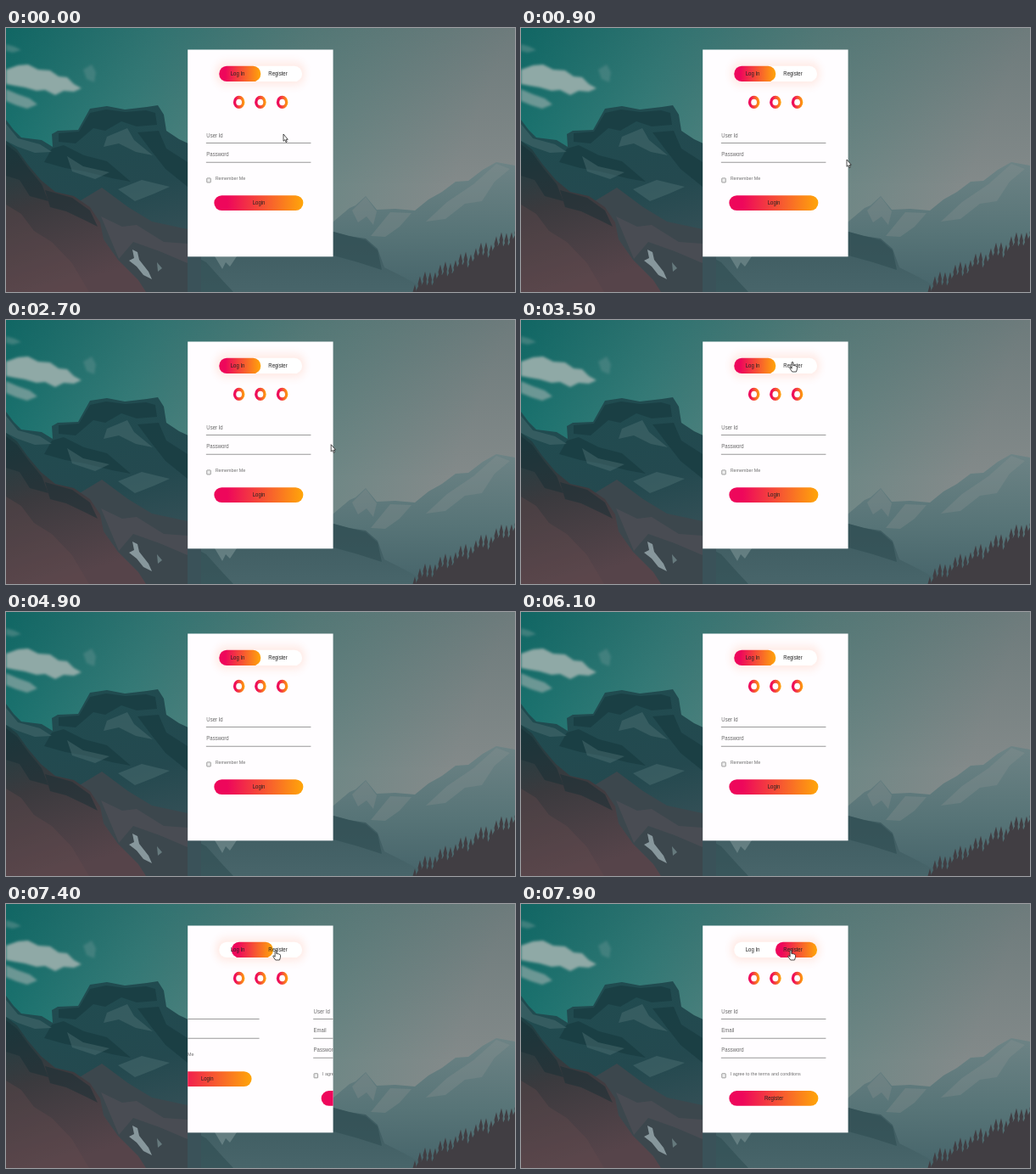
Animation of 600 by 311 pixels, one loop 8000 ms. Source, as an HTML page:

```html
<!DOCTYPE html>
<html lang="en">
<head>
<meta charset="utf-8">
<title>Login form</title>
<style>
  html, body { margin: 0; width: 100%; height: 100%; overflow: hidden; background: #3f7775; }
  svg { display: block; width: 100vw; height: 100vh; }
  text { font: 13.33px "Liberation Sans", Arial, sans-serif; fill: #222; }
  .hint { fill: #686868; }
  .small { font-size: 12px; fill: #707070; }
</style>
</head>
<body>
<svg viewBox="0 0 600 311" preserveAspectRatio="none">
  <defs>
    <linearGradient id="sky" gradientUnits="userSpaceOnUse" x1="0" y1="0" x2="520" y2="200">
      <stop offset="0" stop-color="#0f706c"/><stop offset=".3" stop-color="#37807c"/>
      <stop offset=".6" stop-color="#618582"/><stop offset="1" stop-color="#838a8a"/>
    </linearGradient>
    <linearGradient id="shade" x2="0" y2=".6">
      <stop offset="0" stop-color="#173f42" stop-opacity=".2"/>
      <stop offset="1" stop-color="#173f42" stop-opacity="0"/>
    </linearGradient>
    <linearGradient id="peak" x2=".3" y2="1">
      <stop offset="0" stop-color="#1f4c50"/><stop offset=".6" stop-color="#24494f"/>
      <stop offset="1" stop-color="#3a5259"/>
    </linearGradient>
    <linearGradient id="near" x2=".3" y2="1">
      <stop offset="0" stop-color="#1c3f43"/><stop offset=".45" stop-color="#3b3a3e"/>
      <stop offset="1" stop-color="#56444a"/>
    </linearGradient>
    <linearGradient id="far" x2="0" y2="1">
      <stop offset="0" stop-color="#6d8385"/><stop offset=".55" stop-color="#577477"/>
      <stop offset="1" stop-color="#46646a"/>
    </linearGradient>
    <linearGradient id="valley" x2="0" y2="1">
      <stop offset="0" stop-color="#3d5b60"/><stop offset="1" stop-color="#48656a"/>
    </linearGradient>
    <linearGradient id="warm">
      <stop offset="0" stop-color="#ee075b"/><stop offset=".15" stop-color="#ee075b"/>
      <stop offset="1" stop-color="#ffa609"/>
    </linearGradient>
    <filter id="soft" x="-30%" y="-80%" width="160%" height="260%"><feGaussianBlur stdDeviation="10"/></filter>
    <filter id="mist" x="-30%" y="-40%" width="160%" height="180%"><feGaussianBlur stdDeviation="1.6"/></filter>
    <clipPath id="frame"><rect width="380" height="480"/></clipPath>
  </defs>

  <!-- landscape -->
  <rect width="600" height="311" fill="url(#sky)"/>
  <rect width="600" height="311" fill="url(#shade)"/>
  <g fill="#8fa9a6" filter="url(#mist)">
    <path d="M0 49 14 44 26 43 38 49 52 50 62 57 72 58 80 66 89 71 80 75 68 74 58 79 46 73 36 74 22 70 10 68 0 66Z"/>
    <path d="M0 72 14 78 28 83 37 90 25 95 12 91 0 86Z" opacity=".7"/>
    <path d="M91 49 101 43 106 52 104 64 95 60Z" opacity=".25"/>
    <path d="M0 19 10 22 18 26 8 29 0 27Z" opacity=".35"/>
  </g>
  <path fill="url(#far)" d="M370 240 386 228 405 212 412 209 424 198 437 214 459 213 482 215 498 202 514 193 530 181 545 180 562 167 578 158 600 162V311H370Z"/>
  <g fill="#87908f" opacity=".35">
    <path d="M424 199 437 216 433 232 425 222 415 229 408 215Z"/>
    <path d="M578 160 594 166 576 181 561 204 541 207 518 225 495 228 520 205 551 184Z"/>
    <path d="M453 217 478 218 464 234 447 246 430 245Z"/>
  </g>
  <path fill="url(#valley)" d="M200 240H386L404 245 424 248 438 260 446 282 470 294 500 311H200Z"/>
  <path fill="#7b9294" opacity=".6" d="M246 269H272L264 281 259 276 255 284Z"/>
  <path fill="#2f4d53" opacity=".6" d="M214 264 236 276 254 296 268 311H200V264ZM386 240 424 250 438 262 443 285 415 276 386 268Z"/>
  <path fill="url(#peak)" d="M0 108 9 120 18 129 42 132 55 140 54 125 61 121 85 120 99 95 119 92 140 96 166 93 179 91 186 102 189 121 204 131 230 143V311H0Z"/>
  <g fill="#183b40" opacity=".7">
    <path d="M62 124 86 122 99 100 118 96 141 99 165 97 176 100 178 114 154 116 136 110 117 121 103 118 82 136 62 134Z"/>
    <path d="M54 142 68 138 92 150 119 157 147 181 125 177 93 169 70 165 45 158Z"/>
    <path d="M155 123 180 121 189 142 214 158V187L188 166 170 143Z"/>
  </g>
  <g fill="#55777a" opacity=".4">
    <path d="M0 113 14 130 40 137 54 146 34 147 14 140 0 133Z"/>
    <path d="M119 128 143 118 151 132 173 150 153 146 133 136 115 140Z"/>
    <path d="M72 151 91 163 122 170 105 178 78 169Z"/>
    <path d="M132 190 160 179 193 187 175 195 152 204Z"/>
  </g>
  <path fill="#3c474d" d="M85 205 113 188 144 211 172 228 214 237V311H92Z"/>
  <path fill="#57535a" opacity=".5" d="M112 222 137 234 154 232 186 252 214 254V277L181 263 150 252 133 272Z"/>
  <path fill="url(#near)" d="M0 133 13 143 25 160 41 179 58 193 80 198 99 211 111 229 115 249 132 273 156 297 165 311H0Z"/>
  <g fill="#182f35" opacity=".5">
    <path d="M0 137 13 147 27 166 42 184 50 204 28 198 16 179 0 174Z"/>
    <path d="M46 191 78 200 99 215 108 234 92 226 71 216 52 211Z"/>
  </g>
  <path fill="#654a4f" opacity=".35" d="M0 208 18 219 33 239 54 252 78 277 98 311H0Z"/>
  <path fill="#87979c" d="M149 261 155 264 157 273 168 287 172 296 162 291 154 281 145 274 151 271Z"/>
  <path fill="#71878a" opacity=".8" d="M178 276 184 283 179 287Z"/>
  <path id="trees" fill="#413e43"/>

  <!-- card -->
  <g transform="translate(214.2 25.5) scale(.451 .508)">
    <rect width="380" height="480" fill="#fffdff"/>
    <g clip-path="url(#frame)">
      <rect x="73" y="29" width="234" height="53" rx="26" fill="#ff6124" opacity=".12" filter="url(#soft)"/>
      <rect x="82" y="38" width="217" height="36" rx="20" ry="18" fill="#fff"/>
      <rect id="pill" x="82" y="38" width="109" height="36" rx="20" ry="18" fill="url(#warm)"/>
      <text x="112" y="61">Log In</text>
      <text x="211" y="61">Register</text>
      <g id="icons"></g>
      <g id="login"></g>
      <g id="register"></g>
    </g>
  </g>

  <!-- pointer -->
  <g id="pointer" stroke="#222" stroke-width=".8" fill="#fff" stroke-linejoin="round">
    <path id="arrow" d="M0 0V8.3L1.8 6.7 3 9.6 4.3 9 3.1 6.3H5.3Z"/>
    <path id="hand" d="M-.9 1Q0-.6.9 1V4.6L2.2 4.5 2.7 5 3.8 4.8 4.3 5.4Q5.4 5.2 5.5 6.4V8.6L4.5 12H-.3L-3.2 7.8Q-3.2 6.6-2.1 6.9L-.9 8.2Z"/>
  </g>
</svg>
<script>
const LOOP = 8000, CLICK = 7300, SLIDE = 500;
const get = id => document.getElementById(id);
const clamp = v => Math.min(1, Math.max(0, v));
const smooth = v => v * v * (3 - 2 * v);

// CSS "ease": cubic-bezier(.25, .1, .25, 1)
function ease(x) {
  const bez = (a, b, s) => 3 * a * s * (1 - s) ** 2 + 3 * b * s * s * (1 - s) + s ** 3;
  let lo = 0, hi = 1;
  for (let i = 0; i < 24; i++) {
    const mid = (lo + hi) / 2;
    if (bez(.25, .25, mid) < x) lo = mid; else hi = mid;
  }
  return bez(.1, 1, lo);
}

function form(fields, note, action) {
  const shift = (fields.length - 2) * 45;
  const rows = fields.map((name, i) =>
    `<text class="hint" x="49" y="${203 + i * 45}">${name}</text>
     <path d="M48 ${216.5 + i * 45}H322" stroke="#999" stroke-width="2"/>`).join('');
  return `${rows}
    <rect x="50" y="${298 + shift}" width="10" height="10" rx="1" fill="#eee" stroke="#858585" stroke-width="1.6"/>
    <text class="small" x="72" y="${303 + shift}">${note}</text>
    <rect x="69" y="${338 + shift}" width="233" height="35" rx="20" ry="17.5" fill="url(#warm)"/>
    <text x="186" y="${360 + shift}" text-anchor="middle">${action}</text>`;
}
get('login').innerHTML = form(['User Id', 'Password'], 'Remember Me', 'Login');
get('register').innerHTML = form(['User Id', 'Email', 'Password'], 'I agree to the terms and conditions', 'Register');
get('icons').innerHTML = [134, 190, 247].map(x =>
  `<circle cx="${x}" cy="122" r="15" fill="url(#warm)"/><circle cx="${x}" cy="122" r="7.5" fill="#fff"/>`).join('');

// Fir trees rising towards the right edge
let firs = 'M475 311';
for (let i = 0; i < 21; i++) {
  const x = 482 + i * 6, top = 302 - i * 3.1 - 9 * Math.abs(Math.sin(i * 2.3));
  firs += `L${x - 4} ${top + 16} ${x - 2} ${top + 12} ${x - 2.5} ${top + 9} ${x} ${top} ${x + 2} ${top + 9} ${x + 1.5} ${top + 12}`;
}
get('trees').setAttribute('d', firs + 'L604 311Z');

// Pointer stops: time, x, y
const stops = [
  [0, 327, 125], [150, 327, 125], [900, 384, 155], [1400, 395, 165], [2500, 395, 165],
  [3300, 320, 49], [3700, 320, 49], [4400, 326, -16], [6400, 610, 24],
  [7000, 338, 56], [7120, 338, 56], [7290, 318, 54], [LOOP, 318, 54]
];

function pointerAt(t) {
  const i = stops.findIndex(s => s[0] > t);
  const [t0, x0, y0] = stops[i - 1], [t1, x1, y1] = stops[i];
  const k = smooth((t - t0) / (t1 - t0));
  return [x0 + (x1 - x0) * k, y0 + (y1 - y0) * k];
}

function draw(now) {
  const t = now % LOOP;
  const k = ease(clamp((t - CLICK) / SLIDE));
  get('pill').setAttribute('x', 82 + 108 * k);
  get('login').setAttribute('transform', `translate(${-450 * k})`);
  get('register').setAttribute('transform', `translate(${400 * (1 - k)})`);

  const [x, y] = pointerAt(t);
  const over = x > 251 && x < 349 && y > 44 && y < 63;
  get('pointer').setAttribute('transform', `translate(${x} ${y})`);
  get('pointer').style.display = t > 4400 && t < 6400 ? 'none' : '';
  get('hand').style.display = over ? '' : 'none';
  get('arrow').style.display = over ? 'none' : '';
  requestAnimationFrame(draw);
}
draw(0);
</script>
</body>
</html>
```
